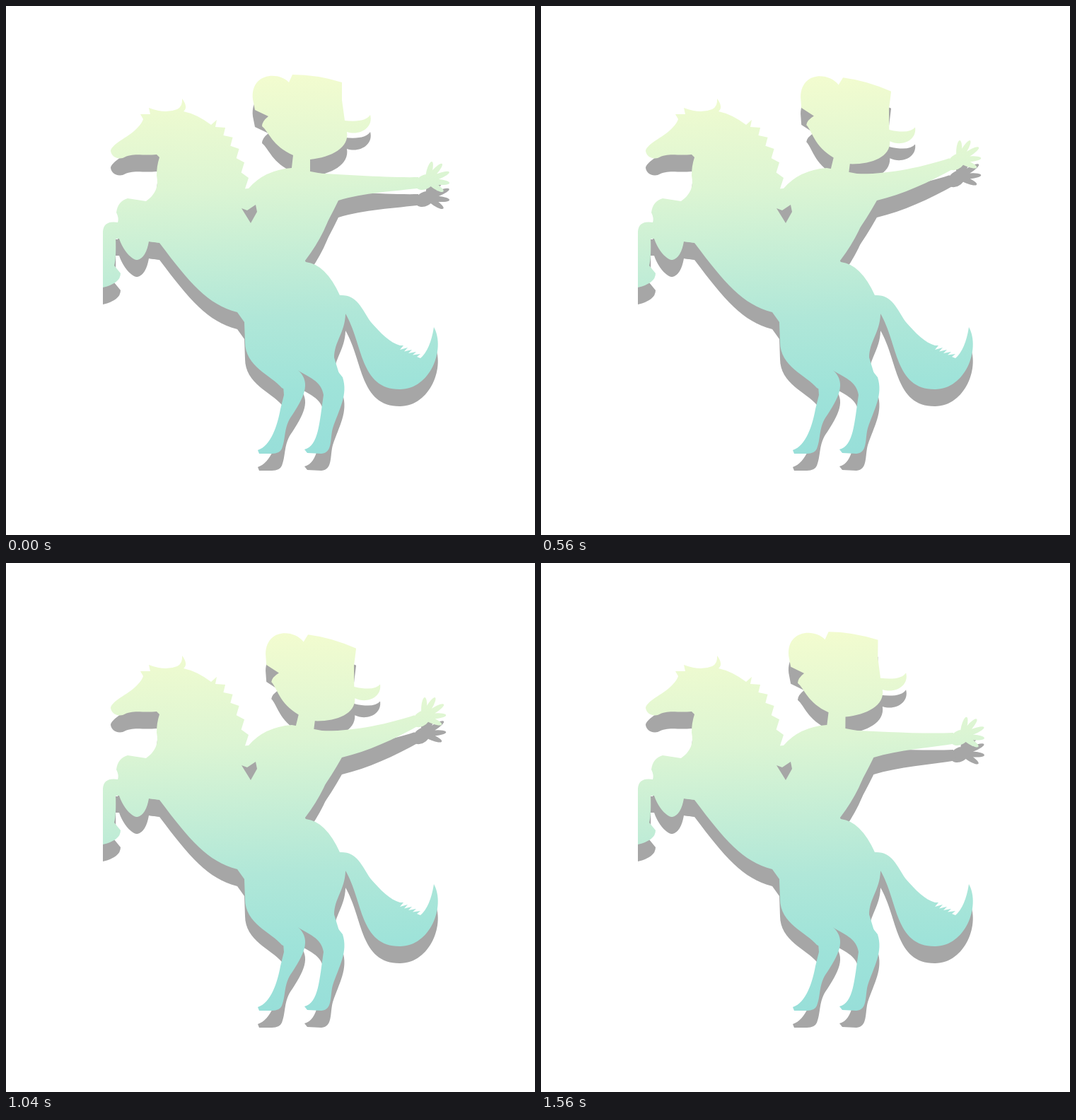
Animation of 748 by 748 pixels, one loop 1600 ms. Source, as an HTML page with a canvas:

```html
<!DOCTYPE html>
<html lang="en">
<head>
<meta charset="utf-8">
<title>Rider</title>
<style>
  html, body { margin: 0; width: 100%; height: 100%; overflow: hidden; background: #fff; }
  canvas { display: block; width: 748px; height: 748px; }
</style>
</head>
<body>
<canvas id="stage" width="748" height="748"></canvas>
<script>
const ctx = document.getElementById('stage').getContext('2d');
const LOOP = 1600, STEP = 40, DROP = 24;
const GREY = '#a6a6a6';

const repeat = (n, fn) => Array.from({ length: n }, (_, i) => fn(i)).join(' ');

// Mane: tufts along a quadratic curve, with a notch after each tip.
const curve = (a, b, c, t) => a * (1 - t) ** 2 + 2 * b * t * (1 - t) + c * t * t;
const onMane = (t, dx, dy) => `L${curve(298, 330, 343, t) + dx} ${curve(161, 185, 243, t) + dy}`;
const mane = repeat(6, i => onMane(i / 5, 0, 0) + onMane(i / 5 + .08, -7, 6));

// Ragged end of the tail.
const tufts = repeat(5, i => `L${562 + 6 * i} ${480 + 3 * i} L${557 + 6 * i} ${486 + 2.5 * i}`);

const horseHead = new Path2D(`M213 210 C190 212 180 207 165 215 C155 217 148 211 148 204
  C153 192 175 185 186 172 Q192 166 194 160 L190 153 204 153 202 144 Q225 153 242 146
  Q250 142 249 131 Q258 143 251 149 Q270 153 290 168 ${mane}
  L343 258 345 290 200 300 198 276 Q218 262 213 240 Q213 226 217 214Z`);
const foreLegs = new Path2D(`M198 276 L172 272 Q158 276 156 292 Q160 300 158 306 Q138 303 137 319
  V398 Q162 392 162 378 L153 367 Q156 355 155 329 H160 C168 352 182 360 186 359
  Q198 356 202 333 L230 336 260 270Z`);
const barrel = new Path2D(`M200 276 L345 258 424 362 Q452 365 472 409 L485 411 480 436
  C479 462 464 475 464 497 L471 520 412 515 400 545 390 540 C375 522 338 510 338 475
  L337 447 327 433 C285 422 260 392 217 335 L202 333Z`);
const nearLeg = new Path2D(`M390 510 L412 514 C430 530 425 548 405 578 C392 595 396 612 390 626
  Q387 633 376 633 H358 L356 628 C375 622 384 592 388 570 L393 550Z`);
const farLeg = new Path2D(`M460 490 L468 515 476 525 C484 550 471 570 462 597
  C458 612 462 632 446 633 L426 632 422 627 C442 622 443 590 449 550 C446 530 428 525 411 514Z`);
const tail = new Path2D(`M472 409 C497 408 502 427 516 447 C530 463 543 476 557 480 ${tufts}
  L586 498 Q600 486 605 454 C622 485 600 542 557 542 C500 542 505 478 480 435 H470Z`);
const torso = new Path2D(`M343 258 Q365 232 404 229 L452 238 464 275 Q455 318 423 360
  L424 400 320 320Z`);
const face = new Path2D(`M400 108 C385 92 345 95 349 132 L352 147 371 156 Q362 163 362 170
  C372 178 376 198 406 211 L402 246 H430 V217 C460 214 486 200 482 178
  C500 184 520 172 515 154 Q508 165 479 162 L475 133 V108 Q440 97 405 97Z`);
const gap = new Path2D('M333 286 L341 289 353 281 355 291 346 307Z');

// Palm with five fingers fanned out evenly.
const hand = new Path2D();
hand.ellipse(592, 249, 14, 10, -.5, 0, 7);
for (let i = 0; i < 5; i++) {
  const a = (27 * i - 75) * Math.PI / 180;
  const r = 14 + 3 * Math.sin(i * Math.PI / 4);
  const x = 595 + r * Math.cos(a), y = 247 + r * Math.sin(a);
  hand.moveTo(x, y);
  hand.ellipse(x, y, r, 4, a, 0, 7);
}

const horse = [horseHead, foreLegs, barrel, nearLeg, farLeg, tail, torso];

const sky = ctx.createLinearGradient(355, 97, 392, 632);
[[0, '#f3fccf'], [.29, '#dcf5d3'], [.64, '#b0e7d8'], [.83, '#9fe3d9'], [1, '#98dfd9']]
  .forEach(s => sky.addColorStop(...s));

const spin = (deg, x, y) => new DOMMatrix().translate(x, y).rotate(deg).translate(-x, -y);

function turned(path, matrix) {
  const out = new Path2D();
  out.addPath(path, matrix);
  return out;
}

// The sleeve stays fixed at the shoulder while its wrist follows the hand.
function sleeve(m, p) {
  const at = (x, y, sag = 0) => {
    const q = m.transformPoint({ x, y });
    return [q.x, q.y + sag * p];
  };
  const arm = new Path2D();
  arm.moveTo(430, 236);
  arm.bezierCurveTo(475, 238 + 5 * p, ...at(540, 243, 7), ...at(583, 242));
  arm.lineTo(...at(588, 257));
  arm.bezierCurveTo(...at(550, 262, 12), 505 + 10 * p, 264 + 3 * p, 470 + 7 * p, 275);
  arm.quadraticCurveTo(457 + 4 * p, 302, 445, 322);
  arm.lineTo(425, 300);
  arm.closePath();
  return arm;
}

function draw(p) {
  const lift = spin(-15.5 * p, 439, 258);
  const parts = [...horse, turned(face, spin(10.3 * p, 383, 274)), turned(hand, lift), sleeve(lift, p)];
  const fillAll = style => {
    ctx.fillStyle = style;
    parts.forEach(s => ctx.fill(s));
  };

  ctx.clearRect(0, 0, 748, 748);
  ctx.save();
  ctx.translate(0, DROP);
  fillAll(GREY);
  ctx.restore();
  fillAll(sky);
  ctx.fillStyle = GREY;
  ctx.fill(gap);
}

const start = performance.now();
function tick() {
  const t = (performance.now() - start) % LOOP;
  const phase = Math.floor(t / STEP) * STEP / LOOP;
  draw(1 - Math.abs(1 - 2 * phase));
  requestAnimationFrame(tick);
}
tick();
</script>
</body>
</html>
```
